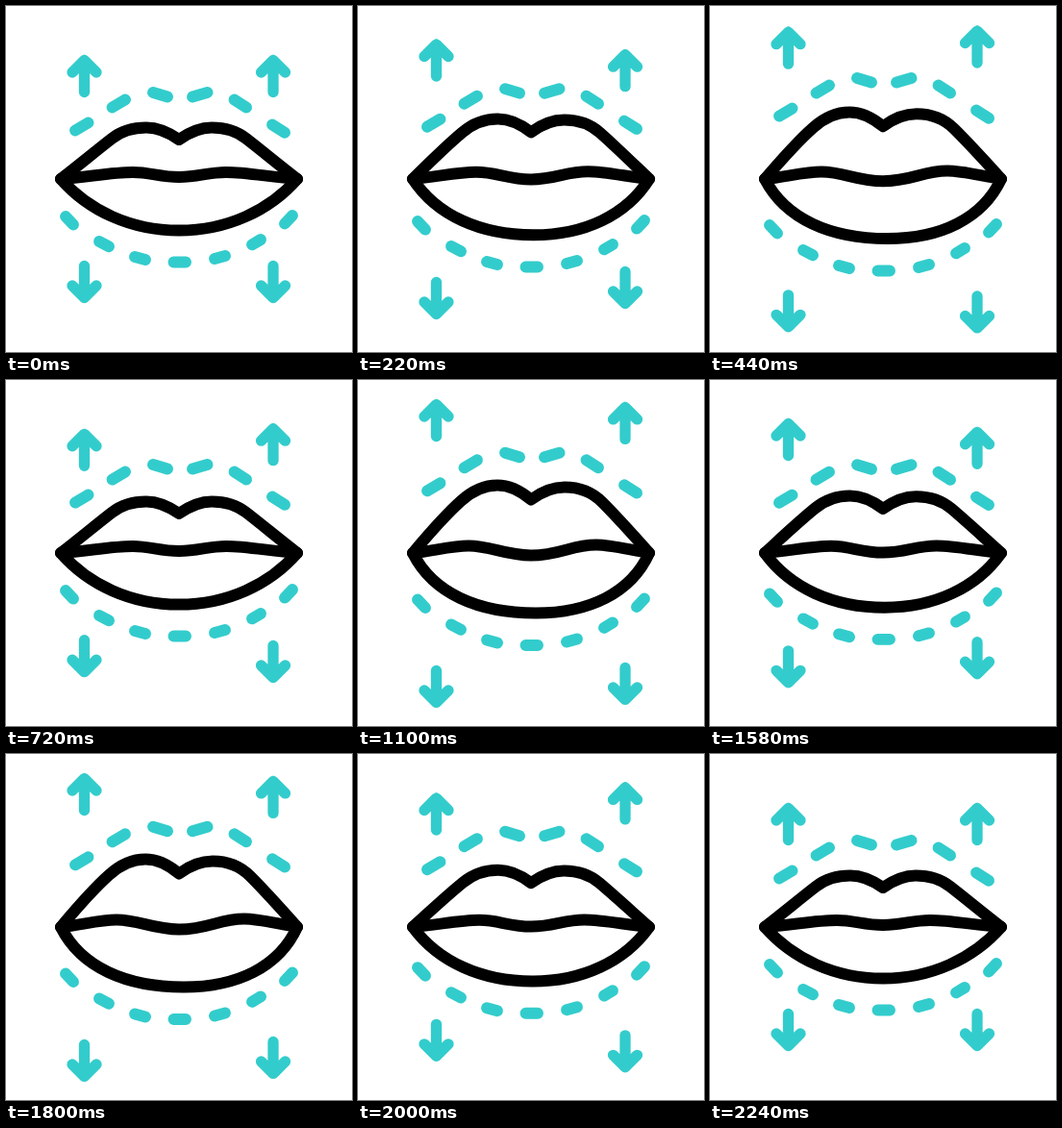
These frames come from a looping animation (360 px wide and 360 px high, 2.4 s). An HTML page:

```html
<!DOCTYPE html>
<html lang="en">
<head>
<meta charset="utf-8">
<title>Lips</title>
<style>
  html, body { margin: 0; width: 100%; height: 100%; overflow: hidden; background: #fff; }
  svg { display: block; width: 100%; height: 100%; }
  path { fill: none; stroke-linecap: round; stroke-linejoin: round; }
  .arrows { stroke: #33cccc; stroke-width: 11.3; }
  .dashes { stroke: #33cccc; stroke-width: 11.9; }
  .ink { stroke: #000; stroke-width: 12; }
</style>
</head>
<body>
<svg viewBox="0 0 360 360">
  <g class="arrows">
    <path id="topLeft" d="M81.5 89.5V56.5M69 69L81.5 56.5L94 69"/>
    <path id="topRight" d="M278 89.5V56.5M265.5 69L278 56.5L290.5 69"/>
    <path id="lowLeft" d="M81.5 270.5V303.5M69 291L81.5 303.5L94 291"/>
    <path id="lowRight" d="M278 270.5V303.5M265.5 291L278 303.5L290.5 291"/>
  </g>
  <g class="dashes">
    <path id="topDashes" d="M72 129.5L85.5 121.5M110.5 105.5L124 97.5M153 90L168 94.5M194 94.5L209.5 90M237.5 97.5L250 105.5M277 123.5L290 131.7"/>
    <path id="lowDashes" d="M62 219L70 227.5M97 245L107 250.3M134 261L145 264M174.5 266.5H187M217 263L228 260M256 248.3L265 243M290 226.5L298 218"/>
  </g>
  <g class="ink">
    <path id="outline"/>
    <path id="seam"/>
  </g>
</svg>
<script>
const LOOP = 2400, STEP = 20, PERIOD = 700, CYCLES = 3;
const LEAD = 38, MID = 102, LAG = 120;
const el = id => document.getElementById(id);

// Path shapes at rest and fully open; numbers are blended pairwise.
const outline = [
  `M57 180C74 167 92 152 110 138C120 130 133 126.5 146 126.5C159 126.5 170 132 180 139
   C190 132 201 126.5 214 126.5C227 126.5 240 130 250 138C268 152 286 167 303 180
   C274 213 230 233.5 180 233.5C130 233.5 86 213 57 180Z`,
  `M57 180C73 161 89 142 107 126C118 116 131 109.5 145 109.5C159 109.5 170 116 180 124.5
   C190 117 201 111.5 215 111.5C230 111.5 243 116 254 127C270 143 287 162 303 180
   C284 222 240 242.5 185 242.5C125 242.5 78 222 57 180Z`
];
const seam = [
  'M57 180C85 178 110 173 132 173C150 173 160 178 180 178C200 178 210 173 229 173C250 173 275 178 303 180',
  'M57 180C78 178 97 172.5 115 172.5C138 172.5 153 182.5 180 182.5C210 182.5 222 171.5 248 171.5C264 171.5 283 177 303 180'
];

function blend([a, b], k) {
  const ends = b.match(/[\d.]+/g);
  let i = 0;
  return a.replace(/[\d.]+/g, n => (+n + (ends[i++] - n) * k).toFixed(2));
}

function swell(t, start) {
  const phase = Math.min(Math.max((t - start) / PERIOD, 0), CYCLES);
  return (1 - Math.cos(2 * Math.PI * phase)) / 2;
}

const lift = (id, dy) => el(id).setAttribute('transform', `translate(0 ${dy.toFixed(2)})`);

function draw(t) {
  const a = swell(t, LEAD), b = swell(t, LAG);
  lift('topLeft', -31 * a);
  lift('lowLeft', 32 * a);
  lift('topRight', -31 * b);
  lift('lowRight', 32 * b);
  lift('topDashes', -15 * swell(t, MID));
  lift('lowDashes', 9.5 * a);
  el('outline').setAttribute('d', blend(outline, a));
  el('seam').setAttribute('d', blend(seam, a));
}

const begin = performance.now();
function tick() {
  const t = (performance.now() - begin) % LOOP;
  draw(Math.floor(t / STEP) * STEP);
  requestAnimationFrame(tick);
}
tick();
</script>
</body>
</html>
```
